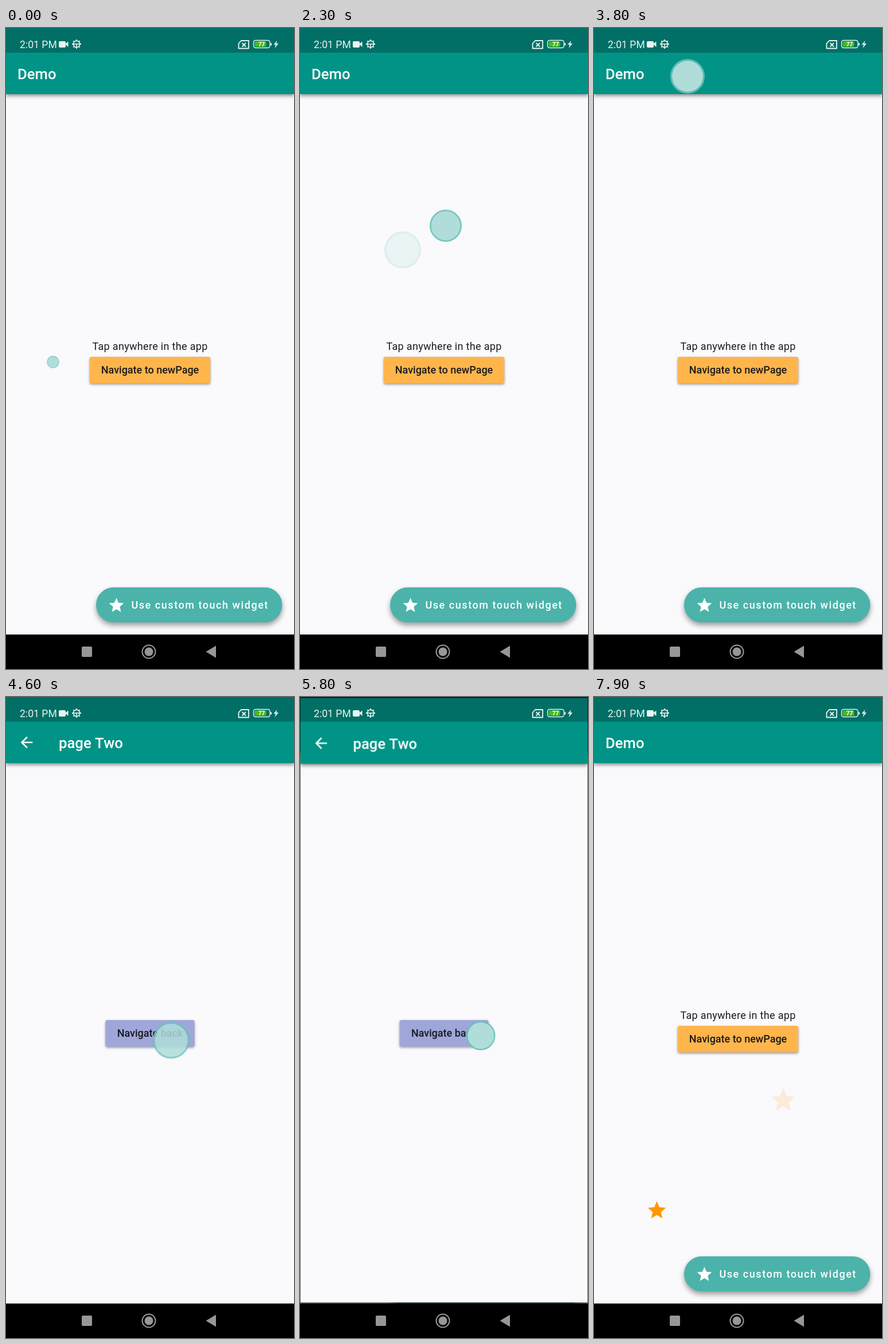
An HTML page with a canvas for the animation above (8 s loop, 502x1115 px).

```html
<!DOCTYPE html>
<html lang="en">
<head>
<meta charset="utf-8">
<title>Touch indicator demo</title>
<style>
html, body { margin: 0; width: 100%; height: 100%; overflow: hidden; background: #000; }
canvas { display: block; }
</style>
</head>
<body>
<canvas id="stage" width="502" height="1115"></canvas>
<script>
const W = 502, H = 1115, APP_H = 1055, LOOP = 8000, STEP = 100;
const DP = 1.286;
const GROW = 300, FADE = 200, NAV = 300;
const TEAL = '#019486', PAPER = '#faf9fc';
const STAR = new Path2D('M12 17.27L18.18 21l-1.64-7.03L22 9.24l-7.19-.61L12 2 9.19 8.63 2 9.24l5.46 4.73L5.82 21z');
const ARROW = new Path2D('M20 11H7.83l5.59-5.59L12 4l-8 8 8 8 1.41-1.41L7.83 13H20z');

// start time, x, y
const dotTaps = [
  [-100, 82, 581], [250, 440, 330], [570, 86, 760],
  [920, 300, 230], [1240, 59, 460], [1540, 440, 700],
  [1844, 179, 386], [2038, 254, 344], [2330, 350, 420], [2620, 90, 700],
  [2960, 350, 760], [3270, 240, 76], [3519, 163, 84],
  [4270, 288, 597], [4870, 270, 590], [5561, 315, 589], [6164, 292, 576],
  [7080, 320, 1003]
];
const starTaps = [[7430, 330, 700], [7670, 109.5, 892]];

// start time, forward
const navs = [[4300, true], [4900, false], [5604, true], [6185, false]];

const ctx = document.getElementById('stage').getContext('2d');
const clamp = v => Math.max(0, Math.min(1, v));
const interval = (t, a, b) => clamp((t - a) / (b - a));

function bezier(x, x1, y1, x2, y2) {
  const at = (u, a, b) => 3 * (1 - u) ** 2 * u * a + 3 * (1 - u) * u * u * b + u ** 3;
  let lo = 0, hi = 1;
  for (let i = 0; i < 24; i++) {
    const mid = (lo + hi) / 2;
    if (at(mid, x1, x2) < x) lo = mid; else hi = mid;
  }
  return at(lo, y1, y2);
}

// Slow start, quick middle, long settling
function zoomEase(t) {
  const split = 1 / 6;
  return t < split
    ? 0.4 * bezier(t / split, 0.05, 0, 0.1333, 0.06)
    : 0.4 + 0.6 * bezier((t - split) / (1 - split), 0.2083, 0.82, 0.25, 1);
}

function text(c, str, x, y, font, color, spacing = 0, align = 'left') {
  c.font = font + ' Roboto, sans-serif';
  c.fillStyle = color;
  c.letterSpacing = spacing + 'px';
  c.textAlign = align;
  c.fillText(str, x, y);
}

function box(c, x, y, w, h, r, fill) {
  c.beginPath();
  c.roundRect(x, y, w, h, r);
  c.fillStyle = fill;
  c.fill();
}

function withShadow(c, dy, blur, alpha, draw) {
  c.save();
  c.shadowColor = `rgba(0,0,0,${alpha})`;
  c.shadowOffsetY = dy;
  c.shadowBlur = blur;
  draw();
  c.restore();
}

function icon(c, path, cx, cy, scale, color, midY = 12) {
  c.save();
  c.translate(cx, cy);
  c.scale(scale, scale);
  c.translate(-12, -midY);
  c.fillStyle = color;
  c.fill(path);
  c.restore();
}

function makePage(title, titleX, drawBody) {
  const page = document.createElement('canvas');
  page.width = W;
  page.height = APP_H;
  const c = page.getContext('2d');
  c.fillStyle = PAPER;
  c.fillRect(0, 0, W, APP_H);
  withShadow(c, 3, 6, 0.45, () => box(c, 0, 0, W, 115, 0, TEAL));
  text(c, title, titleX, 89, '500 25.7px', '#fff');
  drawBody(c);
  return page;
}

const home = makePage('Demo', 20, c => {
  text(c, 'Tap anywhere in the app', 251, 560, '400 18px', '#1b1b1d', 0.32, 'center');
  withShadow(c, 2, 4, 0.4, () => box(c, 146, 572, 210, 46, 3, '#ffb54c'));
  text(c, 'Navigate to newPage', 251, 601, '500 18px', '#1b1a18', 0, 'center');
  withShadow(c, 5, 10, 0.38, () => box(c, 157, 973, 324.5, 61, 30.5, '#4bb3aa'));
  icon(c, STAR, 192.5, 1003.5, DP, '#fff', 11.5);
  text(c, 'Use custom touch widget', 218.5, 1010, '500 18px', '#fff', 1.54);
});

const second = makePage('page Two', 92, c => {
  icon(c, ARROW, 36, 79, DP, '#fff');
  withShadow(c, 2, 4, 0.4, () => box(c, 173.5, 562, 155, 46, 3, '#9fa6d9'));
  text(c, 'Navigate back', 251, 591, '500 18px', '#17171c', 0, 'center');
});

function drawPage(page, scale = 1, alpha = 1) {
  ctx.save();
  ctx.globalAlpha = alpha;
  ctx.translate(W / 2, APP_H / 2);
  ctx.scale(scale, scale);
  ctx.drawImage(page, -W / 2, -APP_H / 2);
  ctx.restore();
}

function drawApp(t) {
  const nav = navs.filter(n => n[0] <= t).pop();
  if (!nav) return drawPage(home);
  const [start, forward] = nav;
  const p = (t - start) / NAV;
  if (p >= 1) return drawPage(forward ? second : home);
  const e = zoomEase(p);
  if (forward) {
    drawPage(home, 1 + 0.05 * e);
    ctx.fillStyle = `rgba(0,0,0,${0.6 * interval(p, 0.2075, 0.4175)})`;
    ctx.fillRect(0, 0, W, APP_H);
    drawPage(second, 0.85 + 0.15 * e, interval(p, 0.125, 0.25));
  } else {
    drawPage(home, 1.1 - 0.1 * e);
    drawPage(second, 1 - 0.1 * e, 1 - interval(p, 0.0825, 0.2075));
  }
}

function drawDot() {
  ctx.beginPath();
  ctx.arc(0, 0, 29, 0, 7);
  ctx.fillStyle = '#b0dddA';
  ctx.fill();
  ctx.beginPath();
  ctx.arc(0, 0, 30.4, 0, 7);
  ctx.lineWidth = 3.2;
  ctx.strokeStyle = 'rgba(105,195,186,.9)';
  ctx.stroke();
}

function drawTaps(taps, t, draw) {
  for (const [start, x, y] of taps) {
    const age = t - start;
    if (age <= 0 || age >= GROW + FADE) continue;
    const scale = clamp(age / GROW);
    ctx.save();
    ctx.globalAlpha = 1 - clamp((age - GROW) / FADE);
    ctx.translate(x, y);
    ctx.scale(scale, scale);
    draw();
    ctx.restore();
  }
}

function poly(points, fill) {
  ctx.beginPath();
  points.forEach(([x, y]) => ctx.lineTo(x, y));
  ctx.closePath();
  if (fill) { ctx.fillStyle = fill; ctx.fill(); } else ctx.stroke();
}

function line(x1, y1, x2, y2) {
  ctx.beginPath();
  ctx.moveTo(x1, y1);
  ctx.lineTo(x2, y2);
  ctx.stroke();
}

function drawGear(x, y) {
  ctx.save();
  ctx.translate(x, y);
  ctx.lineWidth = 1.6;
  ctx.beginPath();
  ctx.arc(0, 0, 5.6, 0, 7);
  ctx.stroke();
  line(-5, 0, 5, 0);
  line(0, 0, 0, 5);
  ctx.lineWidth = 2;
  for (let i = 0; i < 8; i++) {
    ctx.rotate(Math.PI / 4);
    line(6, 0, 8, 0);
  }
  ctx.restore();
}

function drawStatusBar() {
  const ink = '#e9f4f2';
  ctx.fillStyle = 'rgba(0,0,0,.25)';
  ctx.fillRect(0, 0, W, 43);
  text(ctx, '2:01 PM', 24, 35, '400 17.6px', ink);
  ctx.strokeStyle = ink;
  box(ctx, 92, 23, 12, 11, 2, ink);
  poly([[103, 28], [108.5, 23.5], [108.5, 33]], ink);
  drawGear(123, 28);

  ctx.lineWidth = 1.8;
  ctx.lineJoin = 'round';
  poly([[410, 22], [423, 22], [423, 35.5], [405.5, 35.5], [405.5, 27]]);
  line(411.5, 26, 418, 32.5);
  line(418, 26, 411.5, 32.5);

  ctx.lineWidth = 1.4;
  ctx.beginPath();
  ctx.roundRect(431.5, 21.5, 28.5, 13, 3.5);
  ctx.stroke();
  box(ctx, 433.5, 23.5, 20, 9, 1.5, '#45bd16');
  box(ctx, 461, 26, 2, 4.5, 1, ink);
  text(ctx, '77', 445.5, 32, '700 10px', '#fff', 0, 'center');
  poly([[472.5, 22], [466.5, 29], [470, 29], [468.5, 35], [475, 27], [471.3, 27]], ink);
}

function drawNavBar() {
  const gray = '#979797';
  ctx.fillStyle = '#000';
  ctx.fillRect(0, APP_H, W, H - APP_H);
  box(ctx, 132, 1076, 18, 18, 2, gray);
  ctx.beginPath();
  ctx.arc(249, 1085, 11.5, 0, 7);
  ctx.lineWidth = 2;
  ctx.strokeStyle = gray;
  ctx.stroke();
  ctx.beginPath();
  ctx.arc(249, 1085, 7.5, 0, 7);
  ctx.fillStyle = gray;
  ctx.fill();
  poly([[348.5, 1085], [366, 1074.5], [366, 1095.5]], gray);
}

function render(t) {
  drawApp(t);
  drawTaps(dotTaps, t, drawDot);
  drawTaps(starTaps, t, () => icon(ctx, STAR, 0, 0, 2.06, '#ff9800', 11.5));
  drawStatusBar();
  drawNavBar();
}

const begin = performance.now();
function tick() {
  const t = (performance.now() - begin) % LOOP;
  render(Math.floor(t / STEP) * STEP);
  requestAnimationFrame(tick);
}
tick();
</script>
</body>
</html>
```
